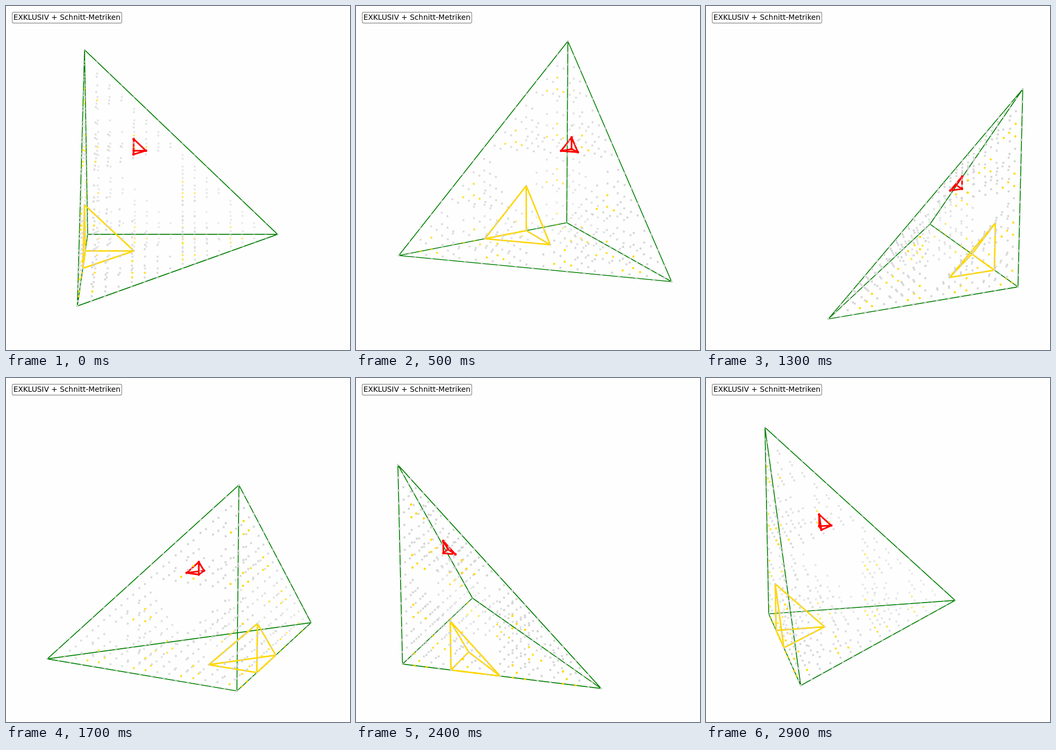
An HTML page with a canvas for the animation above (3000 ms loop, 648 px wide and 648 px high).

```html
<!DOCTYPE html>
<html lang="de">
<head>
<meta charset="utf-8">
<title>Tetraeder</title>
<style>
  html, body { margin: 0; width: 100%; height: 100%; overflow: hidden; background: #fefefe; }
  canvas { display: block; }
</style>
</head>
<body>
<canvas id="stage" width="648" height="648"></canvas>
<script>
const ctx = document.getElementById('stage').getContext('2d');
const N = 16, STEP = 100, FRAMES = 30;
const CX = 332.7, CY = 315.3, SCALE = 382.5, DIST = 9.089;
const ELEV = 18 * Math.PI / 180, ce = Math.cos(ELEV), se = Math.sin(ELEV);
const GREEN = '#008000', GOLD = '#ffd700', RED = '#ff0000', GRAY = '#d3d3d3';

// Corners of a tetrahedron of size s standing at o
const corners = ([x, y, z], s) => [[x, y, z], [x + s, y, z], [x, y + s, z], [x, y, z + s]];
const split = (cells, s) => cells.flatMap(o => corners(o, s));

// Sierpinski tetrahedron: 16 cells of size 4, then 256 of size 1
const cells = split(split([[0, 0, 0]], 8), 4);
const leaves = split(split(cells, 2), 1);
const dots = new Map();
const mark = (list, color) => list.forEach(p => dots.set(p.join(), { p, color }));
leaves.forEach(o => mark(corners(o, 1), GRAY));
cells.forEach(([x, y, z]) => mark(corners([x + 1, y, z], 1), GOLD));

const outer = corners([0, 0, 0], N);
const inner = corners([4, 0, 0], 4);
const leaf = corners([2, 4, 8], 1);

function camera(azim) {
  const c = Math.cos(azim), s = Math.sin(azim);
  return p => {
    const [x, y, z] = p.map(v => v / N - 0.5);
    const front = x * c + y * s;
    const k = 1 / (1 - (front * ce + z * se) / DIST);
    return {
      x: CX + SCALE * k * (y * c - x * s),
      y: CY - SCALE * k * (z * ce - front * se),
      k
    };
  };
}

function wire(points, color, width) {
  ctx.strokeStyle = color;
  ctx.lineWidth = width;
  ctx.lineCap = 'round';
  ctx.beginPath();
  points.forEach((a, i) => points.slice(i + 1).forEach(b => {
    ctx.moveTo(a.x, a.y);
    ctx.lineTo(b.x, b.y);
  }));
  ctx.stroke();
}

function dot({ x, y }, color, r) {
  ctx.fillStyle = ctx.strokeStyle = color;
  ctx.lineWidth = 2.08;
  ctx.beginPath();
  ctx.arc(x, y, r, 0, 2 * Math.PI);
  ctx.fill();
  ctx.stroke();
}

function label() {
  ctx.beginPath();
  ctx.roundRect(11.7, 11.7, 206.3, 20.6, 2.8);
  ctx.fillStyle = '#fff';
  ctx.fill();
  ctx.strokeStyle = '#999';
  ctx.lineWidth = 1.39;
  ctx.stroke();
  ctx.fillStyle = '#000';
  ctx.font = '13.89px "DejaVu Sans", sans-serif';
  ctx.fillText('EXKLUSIV + Schnitt-Metriken', 14, 26);
}

function draw(frame) {
  const project = camera(frame * 2 * Math.PI / FRAMES);
  ctx.fillStyle = '#fefefe';
  ctx.fillRect(0, 0, 648, 648);

  wire(outer.map(project), GREEN, 1.67);
  wire(inner.map(project), GOLD, 2.78);
  wire(leaf.map(project), RED, 3.05);

  // Far dots first and fainter
  const cloud = [...dots.values()]
    .map(d => ({ ...project(d.p), color: d.color }))
    .sort((a, b) => a.k - b.k);
  const far = cloud[0].k, range = cloud[cloud.length - 1].k - far;
  for (const d of cloud) {
    ctx.globalAlpha = 0.3 + 0.7 * (d.k - far) / range;
    dot(d, d.color, 1.15);
  }
  ctx.globalAlpha = 1;
  leaf.map(project).forEach(p => dot(p, RED, 1.4));
  label();
}

let shown = -1;
function tick() {
  const frame = Math.floor(performance.now() / STEP) % FRAMES;
  if (frame !== shown) draw(shown = frame);
  requestAnimationFrame(tick);
}
tick();
</script>
</body>
</html>
```
